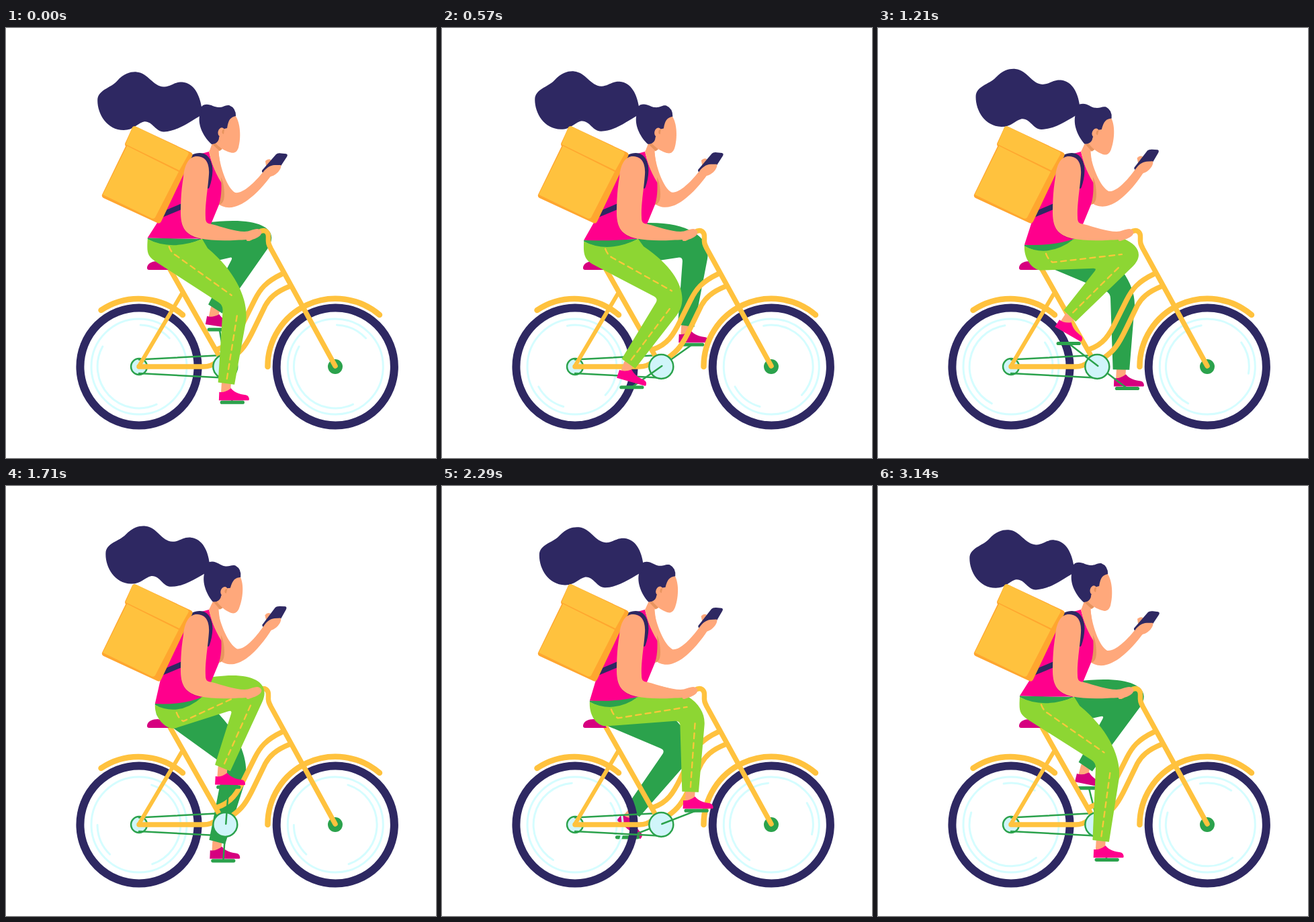
An HTML page for the animation above (3.21 s loop, 640 by 640 pixels).

```html
<!DOCTYPE html>
<html lang="en">
<head>
<meta charset="utf-8">
<title>Cycling courier</title>
<style>
html, body { margin: 0; width: 100%; height: 100%; overflow: hidden; background: #fff; }
svg { display: block; width: 100vw; height: 100vh; }
.line { fill: none; stroke-linecap: round; stroke-linejoin: round; }
.frame { stroke: #ffc23e; stroke-width: 7.5; }
.green { stroke: #2ba24c; stroke-width: 2.5; }
.pale { stroke: #d5fdff; stroke-width: 3; }
.pedal { stroke: #2ba24c; stroke-width: 5.2; }
.skinline { stroke: #ffa87b; stroke-width: 14; }
.stitch { stroke: #fbc73b; stroke-width: 2.3; stroke-dasharray: 8 6.5; }
.navy { fill: #2e2862; }
.skin { fill: #ffa87b; }
.shade { fill: #e8945f; }
.pink { fill: #ff008c; }
.plum { fill: #d6007f; }
.dark { fill: #2ba24c; }
.lime { fill: #8dd633; }
.yellow { fill: #ffc23e; }
.orange { fill: #ffa62f; }
.cyan { fill: #d0f5fa; }
</style>
</head>
<body>
<svg viewBox="0 0 640 640">
  <defs>
    <path id="shoe" d="M0 0L.5-12.5Q9-11 18-18C24-11 32-9 40-8Q45-7 45-1L44 0Z"/>
    <g id="tyre">
      <circle class="line pale" r="71"/>
      <circle class="line" r="87.6" stroke="#2e2862" stroke-width="12"/>
    </g>
    <g id="spokes" class="line pale">
      <path d="M0-62A62 62 0 0 1 43.8-43.8"/>
      <path d="M-55.2-28.1A62 62 0 0 0 28.1 55.2"/>
    </g>
  </defs>

  <g id="farLeg">
    <path class="line skinline" data-part="ankle"/>
    <use href="#shoe" class="plum" data-part="shoe"/>
    <path class="line pedal" data-part="pedal"/>
    <path class="dark" data-part="trouser"/>
    <path class="line green" data-part="crank"/>
  </g>

  <g transform="translate(198 504)"><use href="#tyre"/><use href="#spokes" class="spin"/></g>
  <g transform="translate(490.3 504)"><use href="#tyre"/><use href="#spokes" class="spin"/></g>

  <circle class="cyan green" cx="198" cy="504" r="12"/>
  <path class="line green" d="M198 493.5L322 487M198 514L322 520.5"/>
  <circle class="dark" cx="490" cy="504" r="11"/>
  <g class="line frame">
    <path stroke-width="8.5" d="M141.5 420A101 101 0 0 1 263 427M389.5 504A101 101 0 0 1 556 427"/>
    <path d="M198 504H294Q305 504 312 498"/>
    <path stroke-width="6" d="M198 503L262 395"/>
    <path d="M240 352L316 486"/>
    <path d="M411 366C386 378 378 389 370 405L355 435C344 458 335 471 315 478"/>
    <path d="M422 384.5C401 393 392 402 386 413L369 448C358 471 351 481 336 491"/>
    <path d="M362 313L376 304C386 298 391 304 390.5 312C390 320 391 322 394 328L490 503"/>
  </g>
  <path class="plum" d="M210 356C211 350 218 347 226 347L240 350L245 360H213Q209.5 360 210 356Z"/>
  <circle class="cyan green" cx="326.3" cy="504" r="18"/>

  <g id="nearLeg">
    <path class="line green" data-part="crank"/>
    <path class="line pedal" data-part="pedal"/>
    <path class="line skinline" data-part="ankle"/>
    <use href="#shoe" class="pink" data-part="shoe"/>
    <path class="dark" data-part="waist"/>
    <path class="lime" data-part="trouser"/>
    <path class="line stitch" data-part="thighSeam"/>
    <path class="line stitch" data-part="shinSeam"/>
  </g>

  <g id="farArm">
    <path class="skin" d="M304 184L316 181C318 207 329 238 341 245C352 247 369 231 382 215L395 219C381 239 358 262 340 266C330 269 320 266 314 260Z"/>
    <path class="skin" d="M387 205L386 198Q390 194 394 196L398 203Z"/>
    <path class="navy" d="M381 212L402 188Q404 186 409 186.5L417 187.5Q420 188.5 418 192L408 207L386 216Q380 216 381 212Z"/>
    <path class="skin" d="M381 217C386 209 393 204 400 204L409 204C411 209 403 219 394 221L386 226Z"/>
  </g>

  <path id="shirt" class="pink"/>
  <path class="skin" d="M302 184L308 172L320 176L316.5 184C318 202 321 216 325 226L321 231C309 211 306 200 302 184Z"/>
  <path class="shade" d="M320 222C325 231 326 250 324 256Q322 262 317 263C321 250 321 238 320 222Z"/>
  <path class="plum" d="M262 270C257 290 264 309 288 314L300 312L285 285Z"/>
  <path class="navy" d="M238 271L264 260V269L230 283Z"/>
  <path class="line" stroke="#2e2862" stroke-width="6" d="M277 192C294 184 304 193 304.5 212Q304 225 300 236"/>

  <g id="head">
    <path class="skin" d="M304 180L309 165L326 170L317 183Z"/>
    <path class="shade" d="M308 174L313 170L322 180L318 183Z"/>
    <path class="skin" d="M318 140L341 130C349 141 350 163 346 178C343 187 338 187 330 184C322 181 316 176 311 171Z"/>
    <path class="navy" d="M288 130Q287 119 293 115C302 111 309 118 316 118C324 118 326 114 332 115Q342 119 342 131C334 133 331 136 329 149L321 151L317 163C317 169 312 173 306 173C296 164 285 147 288 130Z"/>
    <ellipse class="skin" cx="320.5" cy="155" rx="5" ry="6.8" transform="rotate(15 320.5 155)"/>
    <path class="shade" d="M322 152L325 150L324 158Q320 157 322 152Z"/>
  </g>
  <path id="hair" class="navy" d="M291 118Q292 124 290 130C274 139 255 154 235 154.500C222 155 218 138 205 139.500C195 142 190 152 175 152C150 152 136 128 136 108C136 92 155 90 165 79C176 67 186 65 194 65.500C212 67 218 87 235 87.500C246 87 250 80 262 80.500C280 82 288 100 291 118Z"/>

  <path class="orange" d="M188 148Q190 145 194 147L275 185Q279 187 277 191L231 288Q229 292 225 290L145 253Q142 251 143 248L178 176Q176 173 178 170Z"/>
  <path class="yellow" d="M188 148Q190 145 194 147L270 184Q273 186 271 189L258 212L178 173Z"/>
  <path class="yellow" d="M180 175.500L257 214L222 282Q220 285 216 283L144 248Z"/>

  <path class="skin" d="M264 222C266 198 276 190 285 191C299 192 303 204 302 218C300 245 296 262 297 282C297 290 300 291 306 292C322 296 340 303 355 303C362 303 368 299 374 299C380 300 382 304 379 308C375 313 366 315 361 317Q357 317 358 315C340 316 310 318 288 313C268 308 260 298 260 275C260 255 261 240 264 222Z"/>
</svg>
<script>
const LOOP = 3210, STEPS = 45, TAU = 2 * Math.PI;
const CRANK = [327.3, 503], CRANK_LENGTH = 55, CRANK_START = 80;
const THIGH = 133, SHIN = 127, KNEE_WIDTH = 19.5, CUFF_WIDTH = 12.3;
const BELT = [292, 314];

const $ = id => document.getElementById(id);
const rad = deg => deg * Math.PI / 180;
const pt = p => p.map(v => v.toFixed(2)).join(' ');
const mix = (a, b, k) => a.map((v, i) => v + (b[i] - v) * k);
const shift = (p, x, y) => [p[0] + x, p[1] + y];
const along = (p, dir, k) => shift(p, dir[0] * k, dir[1] * k);
const polar = (deg, r) => [r * Math.cos(rad(deg)), r * Math.sin(rad(deg))];
const front = ([x, y]) => [y, -x];

function unit(from, to) {
  const x = to[0] - from[0], y = to[1] - from[1], d = Math.hypot(x, y);
  return [x / d, y / d];
}

// Moves p by (x, y) measured in a frame turned by deg.
function turned(p, deg, x, y) {
  const [c, s] = polar(deg, 1);
  return shift(p, x * c - y * s, x * s + y * c);
}

const hipAt = u => [238 - 6 * Math.cos(TAU * (u - .08)), 336.3 - 6 * Math.cos(TAU * u)];

function kneeAt(hip, ankle) {
  const d = Math.min(Math.hypot(ankle[0] - hip[0], ankle[1] - hip[1]), THIGH + SHIN);
  const reach = (THIGH ** 2 - SHIN ** 2 + d * d) / (2 * d);
  const dir = unit(hip, ankle);
  return along(along(hip, dir, reach), front(dir), Math.sqrt(THIGH ** 2 - reach ** 2));
}

function drawLeg(id, hip, back, angle, maxTilt) {
  const set = (part, value, attr = 'd') =>
    $(id).querySelector(`[data-part=${part}]`)?.setAttribute(attr, value);

  // The heel lifts while the pedal comes up behind the rider.
  const lift = Math.max(0, Math.cos(rad(angle - 193))) ** 2;
  const tilt = maxTilt * lift;
  const pedal = shift(CRANK, ...polar(angle, CRANK_LENGTH));
  const heel = turned(pedal, tilt, -20 - 12 * lift, -3 - 10 * lift);
  const ankle = turned(heel, tilt, 11, -25);
  const knee = kneeAt(hip, ankle);

  const thigh = unit(hip, knee), shin = unit(knee, ankle);
  const thighUp = front(thigh), shinUp = front(shin);
  const spread = 1 + thighUp[0] * shinUp[0] + thighUp[1] * shinUp[1];
  const miter = KNEE_WIDTH / Math.max(spread, .28);
  const bisector = [thighUp[0] + shinUp[0], thighUp[1] + shinUp[1]];
  const cap = along(knee, bisector, miter), bend = along(knee, bisector, -miter);

  const side = shift(hip, -back, -16), dip = shift(side, 36, 18);
  const top = along(along(hip, thigh, 55), thighUp, 39);
  const seat = along(along(hip, thigh, 3), thighUp, -20);
  const cuffFront = along(ankle, shinUp, CUFF_WIDTH);
  const cuffBack = along(ankle, shinUp, -CUFF_WIDTH);
  const calf = mix(cap, cuffFront, .33);

  set('crank', `M${pt(CRANK)}L${pt(pedal)}`);
  set('pedal', `M${pt(shift(pedal, -15.5, 0))}h31`);
  set('ankle', `M${pt(ankle)}L${pt(turned(heel, tilt, 10, -8))}`);
  set('shoe', `translate(${pt(heel)}) rotate(${tilt})`, 'transform');
  set('waist', `M${pt(side)}L${pt(shift(side, 0, -2))}L${pt(BELT)}Q${pt(shift(dip, 0, 2))} ${pt(side)}Z`);
  set('trouser', `M${pt(side)}`
    + `C${pt(shift(side, -1, 20))} ${pt(mix(seat, bend, -.15))} ${pt(seat)}`
    + `L${pt(mix(bend, seat, .07))}Q${pt(bend)} ${pt(mix(bend, cuffBack, .07))}`
    + `L${pt(cuffBack)}L${pt(cuffFront)}L${pt(calf)}`
    + `C${pt(mix(calf, cap, .65))} ${pt(along(mix(top, cap, .65), thighUp, 6))} ${pt(top)}`
    + `L${pt(BELT)}Q${pt(dip)} ${pt(side)}Z`);

  const seam = shift(hip, 10, -5);
  set('thighSeam', `M${pt(seam)}Q${pt(shift(seam, 3, 9))} ${pt(shift(seam, 10, 13))}`
    + `L${pt(along(knee, thigh, -10))}`);
  set('shinSeam', `M${pt(along(along(knee, shin, 25), shinUp, 3))}L${pt(along(ankle, shin, -6))}`);
}

function draw(ms) {
  const step = Math.min(STEPS - 1, Math.floor(ms / LOOP * STEPS + .1));
  const u = step / (STEPS - .5);
  const angle = CRANK_START + 360 * u;
  const sway = (1 - Math.cos(TAU * (u - .04))) / 2;
  const hip = hipAt(u), hem = shift(hip, -22, -18);

  document.querySelectorAll('.spin').forEach(w => w.setAttribute('transform', `rotate(${1080 * u + 2})`));
  drawLeg('farLeg', shift(hipAt(u + .5), 7, -2), 8, angle + 180, 56);
  drawLeg('nearLeg', hip, 22, angle, 36);
  $('shirt').setAttribute('d', `M${pt(hem)}Q${pt(shift(hem, 45, 2))} 294 313L305 292L317 263`
    + 'C322 252 321 240 321 230C309 211 306 200 302 184L280 190L262 216L232 279Z');
  $('head').setAttribute('transform', `rotate(${8 * sway} 312 185)`);
  $('hair').setAttribute('transform', `translate(${12 * sway} ${-3 * sway}) rotate(${1.7 * sway} 291 118)`);
  $('farArm').setAttribute('transform', `rotate(${-4.3 * sway} 308 203)`);
}

function tick() {
  draw(performance.now() % LOOP);
  requestAnimationFrame(tick);
}
tick();
</script>
</body>
</html>
```
